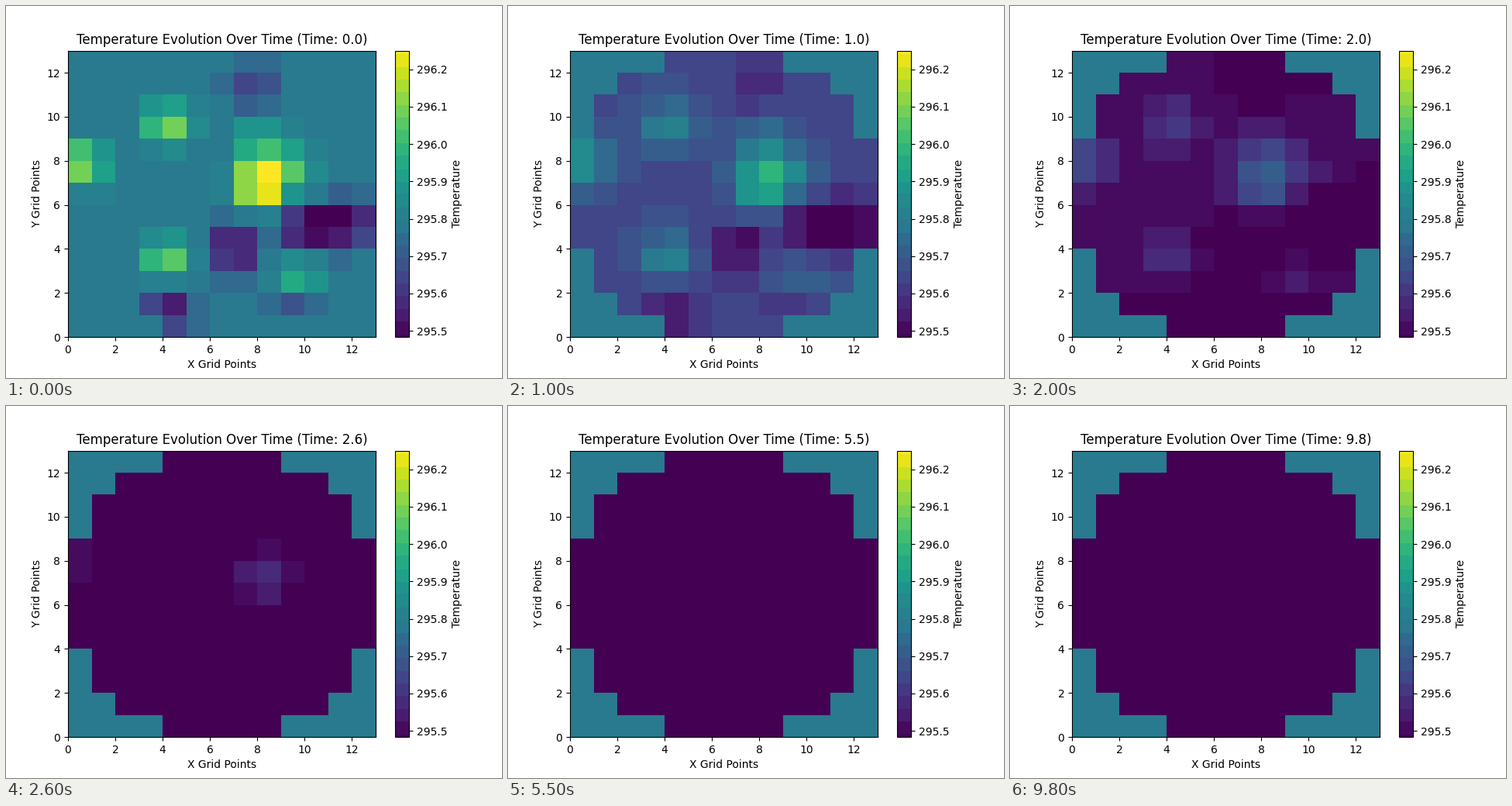
Recreate the animation shown at these times as a matplotlib script. Size 640x480 px, loop 9.9 s.

```python
import numpy as np
import matplotlib.pyplot as plt
from matplotlib.animation import FuncAnimation
from matplotlib.colors import ListedColormap

SIZE = 13
STEPS = 99
DT = 0.1
SUBSTEPS = 5
DIFFUSION = 0.15
DECAY = 0.2

T_MIN, T_MAX = 295.4834, 296.2499
BAND = 256 / 22.5                       # colour band width in map entries
BAND_K = (T_MAX - T_MIN) / 22.5         # the same width in kelvin
BASE_EDGE = 93                          # lower edge of the ambient band
AMBIENT = T_MIN + (BASE_EDGE + BAND / 2) / 256 * (T_MAX - T_MIN)

# Warm and cold spots: x, y, strength in bands
SPOTS = [
    (0.15, 7.4, 10.9),
    (3.7, 9.15, 10.1),
    (3.65, 3.1, 9.3),
    (7.6, 6.45, 18),
    (7.6, 8.3, 7),
    (9, 7.1, 6),
    (9.3, 2.1, 7),
    (9.1, 1, -5),
    (9.6, 4.5, -10.7),
    (11.3, 4.65, -10.7),
    (6.55, 3.55, -9.5),
    (3.75, 0.75, -7.5),
    (7.4, 10.9, -5),
]
SPREAD = 0.95                           # squared 1/e radius of a spot


def banded_viridis():
    viridis = plt.get_cmap("viridis")
    band = np.floor((np.arange(256) - BASE_EDGE) / BAND)
    low = np.maximum(BASE_EDGE + band * BAND, 0)
    high = np.minimum(BASE_EDGE + (band + 1) * BAND, 256)
    centre = ((low + high) / 2).astype(int)
    centre[band == 0] = 104
    centre[band == band[0]] = 0
    centre[band == band[-1]] = 255
    return ListedColormap(viridis(centre))


def disc_mask():
    y, x = np.mgrid[:SIZE, :SIZE] - SIZE // 2
    return x**2 + y**2 <= 6.5**2


def start_field(mask):
    y, x = np.mgrid[:SIZE, :SIZE]
    field = sum(power * np.exp(-((x - cx)**2 + (y - cy)**2) / SPREAD)
                for cx, cy, power in SPOTS)
    return field * mask


def diffuse(field, mask, dt):
    """One step of heat flow with insulated walls around the disc."""
    flow = np.zeros_like(field)
    for axis in (0, 1):
        both_inside = (np.take(mask, range(1, SIZE), axis)
                       & np.take(mask, range(SIZE - 1), axis))
        grad = np.diff(field, axis=axis) * both_inside
        pad = [(0, 0), (0, 0)]
        pad[axis] = (1, 1)
        flow += np.diff(np.pad(grad, pad), axis=axis)
    return field + dt * (DIFFUSION * flow - DECAY * field)


def simulate():
    mask = disc_mask()
    field = start_field(mask)
    history = []
    for step in range(STEPS):
        cooling = 3.8 * (step * DT) ** 1.15
        history.append(AMBIENT + BAND_K * (field - cooling * mask))
        for _ in range(SUBSTEPS):
            field = diffuse(field, mask, DT / SUBSTEPS)
    return history


history = simulate()

fig, ax = plt.subplots(figsize=(6.4, 4.8), dpi=100)
mesh = ax.pcolormesh(history[0], cmap=banded_viridis(), vmin=T_MIN, vmax=T_MAX)
fig.colorbar(mesh, ax=ax, label="Temperature")
ax.set_xlabel("X Grid Points")
ax.set_ylabel("Y Grid Points")
title = ax.set_title("")


def update(step):
    mesh.set_array(history[step])
    title.set_text(f"Temperature Evolution Over Time (Time: {step * DT:.1f})")
    return mesh, title


anim = FuncAnimation(fig, update, frames=STEPS, interval=100,
                     repeat=True, repeat_delay=0, blit=False)
plt.show()
```
